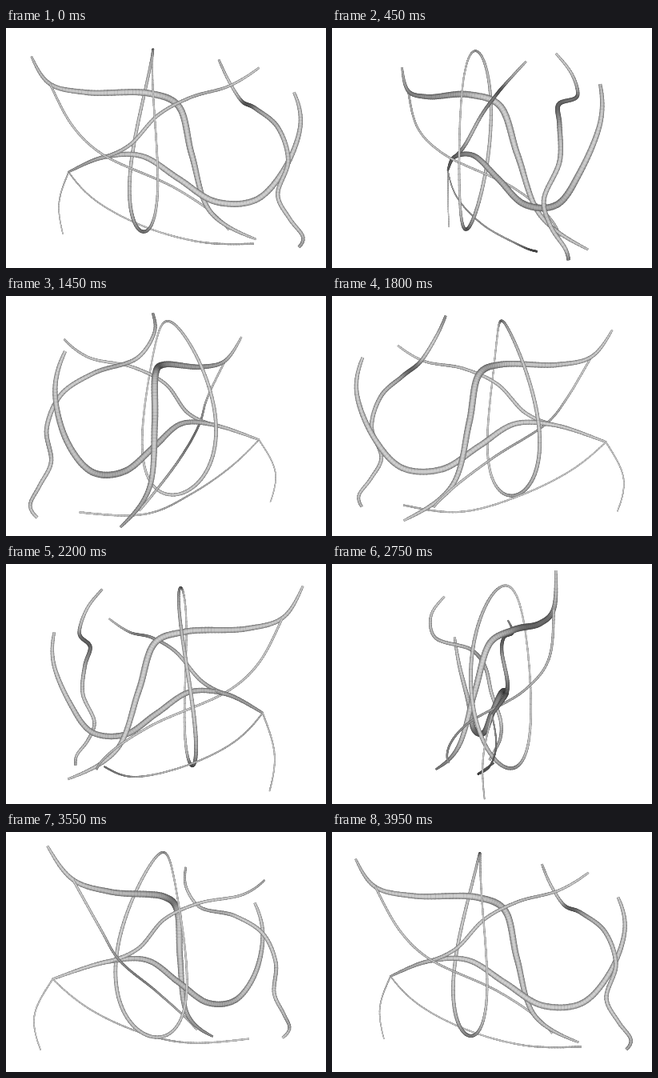
An HTML page with a canvas for the animation above (4 s loop, 400 by 300 pixels).

```html
<!DOCTYPE html>
<html lang="en">
<head>
<meta charset="utf-8">
<title>Turning tubes</title>
<style>
html, body { margin: 0; width: 100%; height: 100%; overflow: hidden; background: #fff; }
canvas { display: block; width: 400px; height: 300px; }
</style>
</head>
<body>
<canvas id="stage" width="400" height="300"></canvas>
<script>
const ctx = document.getElementById('stage').getContext('2d');
const LOOP = 4000, STEP = 50, EYE = 800, CX = 200, CY = 150, PART = 4;
const BANDS = [1, 0.86, 0.7, 0.5, 0.28];
const tubes = [];

const mix = (a, b, t) => a + (b - a) * t;
const dist = (p, q) => Math.hypot(q[0] - p[0], q[1] - p[1], q[2] - p[2]);
const beyond = (a, b, c) => a.map((v, k) => 2.5 * v - 2 * b[k] + 0.5 * c[k]);

// Centripetal spline between p1 and p2.
function between(p0, p1, p2, p3, t) {
  const h0 = Math.sqrt(dist(p0, p1)), h1 = Math.sqrt(dist(p1, p2)), h2 = Math.sqrt(dist(p2, p3));
  return p1.map((b, k) => {
    const a = p0[k], c = p2[k], d = p3[k];
    const m1 = h1 * ((b - a) / h0 - (c - a) / (h0 + h1)) + c - b;
    const m2 = h1 * ((d - c) / h2 - (d - b) / (h1 + h2)) + c - b;
    return b + t * (m1 + t * (3 * (c - b) - 2 * m1 - m2 + t * (2 * (b - c) + m1 + m2)));
  });
}

// Smooth tube through a few points, swelling towards its middle.
function tube(start, end, swell, ...keys) {
  const n = keys.length;
  const p = [beyond(keys[0], keys[1], keys[2]), ...keys,
    beyond(keys[n - 1], keys[n - 2], keys[n - 3])];
  const path = [keys[0]];
  for (let i = 1; i < n; i++) {
    const count = Math.ceil(dist(p[i], p[i + 1]) / PART);
    for (let j = 1; j <= count; j++) path.push(between(p[i - 1], p[i], p[i + 1], p[i + 2], j / count));
  }
  tubes.push(path.map(([x, y, z], i) => {
    const t = i / (path.length - 1);
    return { x, y, z, w: mix(start, end, t) + swell * Math.abs(Math.sin(Math.PI * t)) ** 0.8 };
  }));
}

// Bent closed ring.
function ring(count) {
  const path = [];
  for (let i = 0; i <= count; i++) {
    const a = i / count * 2 * Math.PI;
    const c = Math.cos(a), s = Math.sin(a), c2 = Math.cos(2 * a), s2 = Math.sin(2 * a);
    path.push({
      x: -24.5 + 6.5 * c - 15 * s + 2 * c2 + 7 * s2,
      y: -9.5 - 112 * c,
      z: -7.5 + 1.5 * c + 45.5 * s - 6 * c2 - 5 * s2,
      w: 3.3 + 1.1 * s - 0.7 * c
    });
  }
  tubes.push(path);
}

// Places where tubes meet.
const fork = [-143, -79, -11], merge = [81, 106, 30];
const knot = [-130, 32, 54], joint = [-76, 11, 14];

// long arch and the thin bow beneath it
tube(2.5, 2.5, 5.7, [-168, -114, 0], fork, [-98, -68, -18], [-19.5, -66.5, -20],
  [15, -53, -4], [32.5, 8, 10], [57.5, 82.5, 24], [117, 119, 36]);
tube(2.6, 2.6, 0, fork, [-112, -24.4, -20], [-80, 7, -7],
  [10, 51, 31], [61, 85, 37], merge);
// upper branch and long wave
tube(2.3, 4.6, 0.5, [106, -91.4, -69], [74, -72, -62], [29, -60.7, -29],
  [-10, -40.5, -9], [-45, -4, -1], joint);
tube(2.5, 3.5, 4.6, knot, joint, [-30, 10, 0], [15, 37.7, -6], [61, 66, -13],
  [109.6, 63.6, -17], [143, 27, -22], [165, -29.4, -15], [159, -68.5, -6]);
// thin tails
tube(1.7, 1.3, 0, knot, [-145.5, 76, 70], [-139.6, 115.8, 66]);
tube(1.5, 2.2, 0, knot, [-94, 66.7, 34], [-30.6, 99, 16], [40, 117.4, 3], [103, 113, -45]);
// squiggle
tube(2.8, 3.6, 2, [69.5, -115.5, 40], [83, -91, 54], [98, -64, 44], [110, -48.5, -14],
  [132, -24.6, -44], [141.7, 14, -58], [128, 54.8, -67], [141, 81, -72],
  [156.5, 102, -69], [154, 114.2, -60]);
ring(100);

function project(p, cos, sin) {
  const x = p.x * cos + p.z * sin;
  const z = p.z * cos - p.x * sin;
  const s = EYE / (EYE + z);
  return { x, y: p.y, z, w: p.w * s, sx: CX + x * s, sy: CY + p.y * s };
}

// Sine of the angle between the tube and the line of sight.
function facing(a, b) {
  const t = [b.x - a.x, b.y - a.y, b.z - a.z];
  const v = [a.x, a.y, a.z + EYE];
  const dot = t[0] * v[0] + t[1] * v[1] + t[2] * v[2];
  const c = dot / (Math.hypot(...t) * Math.hypot(...v));
  return Math.sqrt(Math.max(0, 1 - c * c));
}

function drawPart(a, b) {
  const dx = b.sx - a.sx, dy = b.sy - a.sy;
  const len = Math.hypot(dx, dy) || 0.01;
  const ex = dx / len * 0.6, ey = dy / len * 0.6;
  const lit = facing(a, b);
  for (const size of BANDS) {
    const slope = Math.sqrt(1 - (size - 0.08) ** 2);
    const g = Math.round(42 + 170 * slope * lit);
    ctx.strokeStyle = `rgb(${g},${g},${g})`;
    ctx.lineWidth = (a.w + b.w) / 2 * size;
    ctx.beginPath();
    ctx.moveTo(a.sx - ex, a.sy - ey);
    ctx.lineTo(b.sx + ex, b.sy + ey);
    ctx.stroke();
  }
}

function draw(angle) {
  const cos = Math.cos(angle), sin = Math.sin(angle);
  const parts = [];
  for (const path of tubes) {
    const pts = path.map(p => project(p, cos, sin));
    for (let i = 1; i < pts.length; i++) parts.push([pts[i - 1], pts[i]]);
  }
  parts.sort((p, q) => q[0].z + q[1].z - p[0].z - p[1].z);
  ctx.fillStyle = '#fff';
  ctx.fillRect(0, 0, 400, 300);
  for (const [a, b] of parts) drawPart(a, b);
}

let shown = -1;
function tick() {
  const step = Math.floor(performance.now() % LOOP / STEP);
  if (step !== shown) {
    shown = step;
    draw(step * STEP / LOOP * 2 * Math.PI);
  }
  requestAnimationFrame(tick);
}
tick();
</script>
</body>
</html>
```
